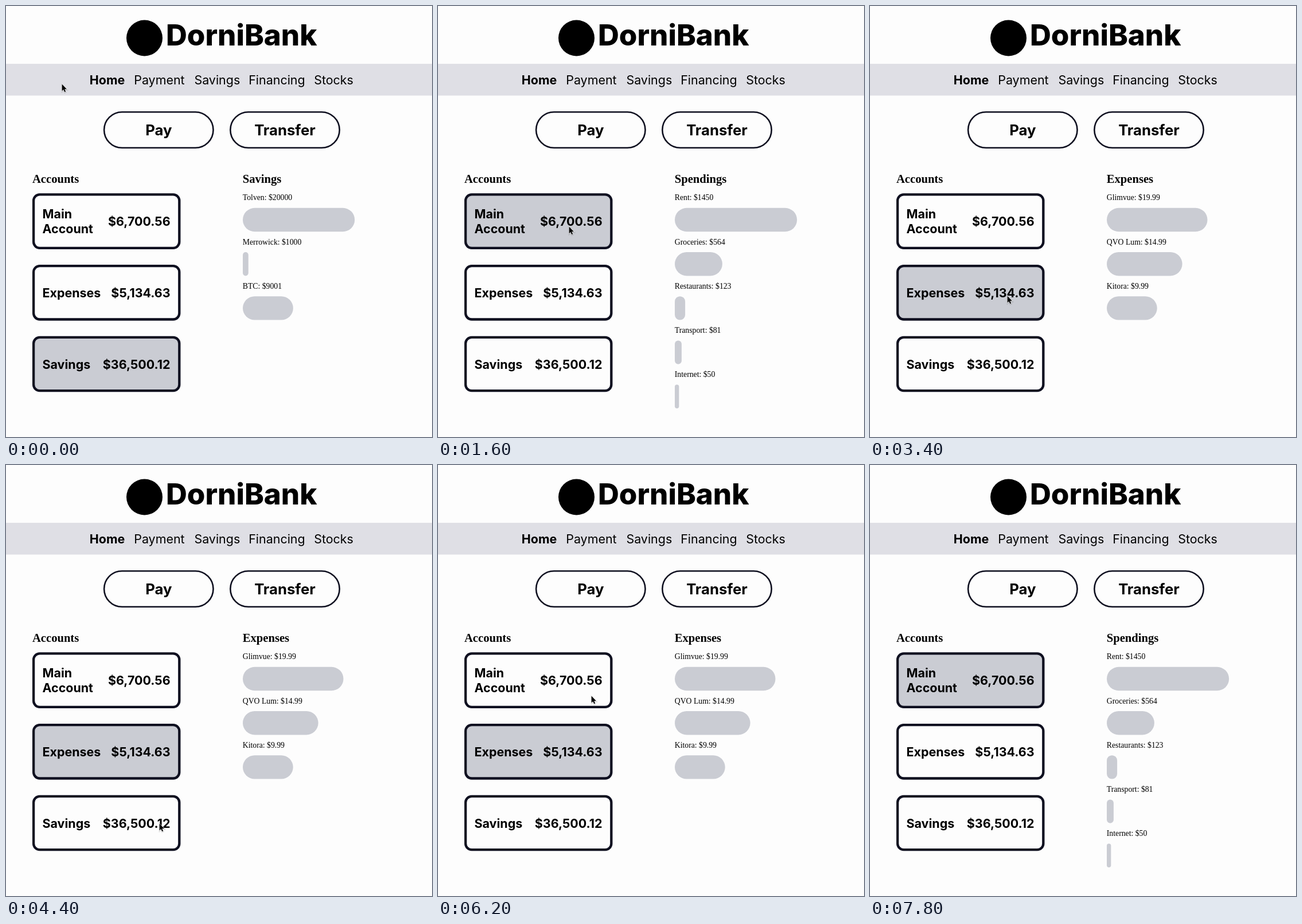
Write an HTML page that moves like this. It is 743 by 753 pixels and loops after 9000 ms.

```html
<!DOCTYPE html>
<html lang="en">
<head>
<meta charset="utf-8">
<title>Bank dashboard</title>
<style>
  html, body { margin: 0; width: 100%; height: 100%; overflow: hidden; background: #fdfdfd; }
  svg { display: block; }
  .sans { font: 400 21.45px Inter, sans-serif; }
  .bold { font-weight: 700; }
  .big { font-size: 25.74px; text-anchor: middle; }
  .end { text-anchor: end; }
  .brand { font: 800 51px Inter, sans-serif; }
  .serif { font: 400 13.73px "Liberation Serif", "Times New Roman", serif; }
  .head { font-size: 20.6px; font-weight: 700; }
  .outline { fill: #fdfdfd; stroke: #0f1020; }
</style>
</head>
<body>
<svg id="stage" width="743" height="753" viewBox="0 0 743 753"></svg>
<script>
const LOOP = 9000, STEP = 200;
const GREY = '#caccd3', PAPER = '#fdfdfd';
const stage = document.getElementById('stage');

function add(parent, tag, attrs, text) {
  const el = document.createElementNS('http://www.w3.org/2000/svg', tag);
  for (const key in attrs) el.setAttribute(key, attrs[key]);
  if (text) el.textContent = text;
  parent.appendChild(el);
  return el;
}
const label = (parent, x, y, cls, text) => add(parent, 'text', { x, y, class: cls }, text);

// Header and navigation
add(stage, 'circle', { cx: 241.5, cy: 56, r: 31.5 });
label(stage, 279, 68.5, 'brand', 'DorniBank');
add(stage, 'rect', { y: 101, width: 743, height: 55.5, fill: '#dfdfe5' });
[['Home', 145.8], ['Payment', 223.2], ['Savings', 328.4], ['Financing', 423.2], ['Stocks', 537.2]]
  .forEach(([text, x], i) => label(stage, x, 136.7, i ? 'sans' : 'sans bold', text));

// Action buttons
[['Pay', 266.3], ['Transfer', 486.5]].forEach(([text, cx]) => {
  add(stage, 'rect', { class: 'outline', x: cx - 95.2, y: 185.2, width: 190.4, height: 62.6, rx: 31.3, 'stroke-width': 2.6 });
  label(stage, cx, 226.3, 'sans bold big', text);
});

// Account cards
label(stage, 46, 308.7, 'serif head', 'Accounts');
const cards = [
  [['Main', 'Account'], '$6,700.56'],
  [['Expenses'], '$5,134.63'],
  [['Savings'], '$36,500.12']
].map(([lines, sum], i) => {
  const g = add(stage, 'g', {});
  const top = 327.3 + i * 124.7;
  const box = add(g, 'rect', { class: 'outline', x: 48.1, y: top + 2.1, width: 254.2, height: 93.4, rx: 10.7, 'stroke-width': 4.3 });
  lines.forEach((line, n) =>
    label(g, 63.5, top + 57 + (n - (lines.length - 1) / 2) * 25.7, 'sans bold', line));
  label(g, 286.6, top + 57, 'sans bold end', sum);
  return box;
});

// Detail panels: title, pixels per dollar, entries
const panels = [
  ['Spendings', 0.147, [['Rent', 1450], ['Groceries', 564], ['Restaurants', 123], ['Transport', 81], ['Internet', 50]]],
  ['Expenses', 8.78, [['Glimvue', 19.99], ['QVO Lum', 14.99], ['Kitora', 9.99]]],
  ['Savings', 0.00976, [['Tolven', 20000], ['Merrowick', 1000], ['BTC', 9001]]]
].map(([title, scale, rows]) => {
  const g = add(stage, 'g', {});
  label(g, 412.8, 308.7, 'serif head', title);
  rows.forEach(([name, value], i) => {
    const y = 352.8 + i * 77.2, width = value * scale, r = Math.min(width, 41.4) / 2;
    label(g, 412.8, y - 13.4, 'serif', `${name}: $${value}`);
    add(g, 'rect', { x: 413, y, width, height: 41.4, rx: r, ry: r, fill: GREY });
  });
  return g;
});

// Pointer
const pointer = add(stage, 'g', {});
const arrow = 'M.6 .6V12.4L3.3 9.9L5.2 14.2L7.1 13.4L5.3 9.2H9Z';
add(pointer, 'path', { d: arrow, transform: 'translate(.3 1)', fill: 'none', stroke: '#000', 'stroke-opacity': .13, 'stroke-width': 2.4 });
add(pointer, 'path', { d: arrow, stroke: '#fff', 'stroke-width': 1.1, 'paint-order': 'stroke' });

// [time, selected card]
const picks = [[0, 2], [1600, 0], [3400, 1], [4800, 2], [5600, 1], [7000, 0]];
// [time, x, y]; points beyond the stage hide the pointer
const route = [
  [0, 97, 136], [200, 77, 14], [400, 70, -60], [1200, 150, -60],
  [1400, 179, 176], [1600, 228, 385], [1800, 228, 385], [2800, 239, 506],
  [4000, 239, 506], [4400, 267, 626], [4800, 267, 626], [5200, 267, 517],
  [5600, 267, 517], [6200, 267, 403], [7000, 267, 403], [7200, 300, 404],
  [7400, 470, 412], [7600, 714, 428], [7800, 800, 435], [LOOP, 800, 435]
];

function position(t) {
  const i = route.findIndex(p => p[0] > t);
  const [t0, x0, y0] = route[i - 1], [t1, x1, y1] = route[i];
  const k = (t - t0) / (t1 - t0);
  return [x0 + (x1 - x0) * k, y0 + (y1 - y0) * k];
}

function draw(ms) {
  const t = Math.floor((ms % LOOP) / STEP) * STEP;
  const chosen = picks.filter(p => p[0] <= t).pop()[1];
  cards.forEach((box, i) => { box.style.fill = i === chosen ? GREY : PAPER; });
  panels.forEach((g, i) => { g.style.display = i === chosen ? '' : 'none'; });
  pointer.setAttribute('transform', `translate(${position(t)})`);
}

const start = performance.now();
function frame() {
  draw(performance.now() - start);
  requestAnimationFrame(frame);
}
frame();
</script>
</body>
</html>
```
